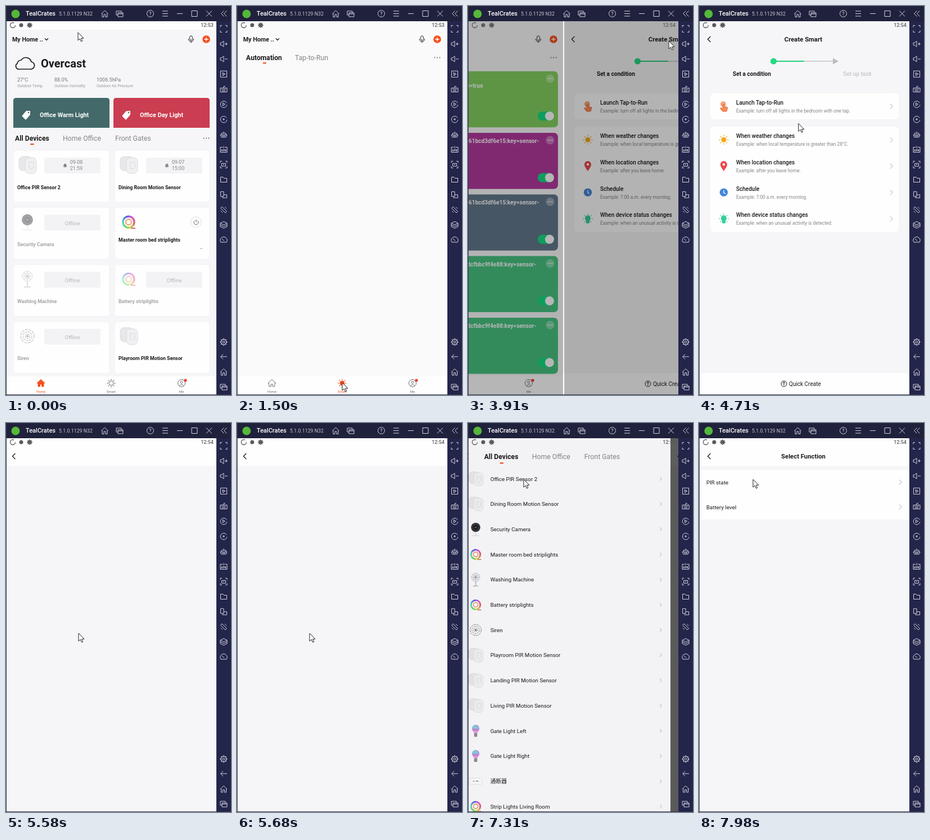
An HTML page that plays this animation: 400x690 px, repeating every 8000 ms.

```html
<!DOCTYPE html>
<html lang="en">
<head>
<meta charset="utf-8">
<style>
  html, body { margin: 0; width: 100%; height: 100%; overflow: hidden; background: #20213c; }
  svg { display: block; font-family: Roboto, "Noto Sans CJK SC", sans-serif; }
</style>
</head>
<body>
<svg id="stage" width="400" height="690" viewBox="0 0 400 690"></svg>
<script>
const PALE = '#f6f6f8', WHITE = '#fefefe', INK = '#1b1b1e', GRAY = '#85858a', ORANGE = '#f4501f';

// Drawing helpers return SVG markup.
const text = (x, y, size, str, fill = INK, weight = 400, anchor = 'start') =>
  `<text x="${x}" y="${y}" font-size="${size}" fill="${fill}" font-weight="${weight}" text-anchor="${anchor}">${str}</text>`;
const rect = (x, y, w, h, fill, r = 0, extra = '') =>
  `<rect x="${x}" y="${y}" width="${w}" height="${h}" fill="${fill}" rx="${r}" ${extra}/>`;
const dot = (x, y, r, fill, extra = '') => `<circle cx="${x}" cy="${y}" r="${r}" fill="${fill}" ${extra}/>`;
const ring = (x, y, r, stroke, width = 1, extra = '') =>
  dot(x, y, r, 'none', `stroke="${stroke}" stroke-width="${width}" ${extra}`);
const path = (d, stroke, width = 1, fill = 'none') =>
  `<path d="${d}" stroke="${stroke}" stroke-width="${width}" fill="${fill}"/>`;
const at = (x, y, content, scale = 1, opacity = 1) =>
  `<g transform="translate(${x} ${y}) scale(${scale})" opacity="${opacity}">${content}</g>`;
const repeat = (n, draw) => Array.from({ length: n }, (_, i) => draw(i)).join('');
const chevron = (x, y, size = 4.5) => path(`M${x - size / 2} ${y - size}l${size} ${size}l${-size} ${size}`, '#c8c8cc', 1.1);
const back = (x, y) => path(`M${x + 2.5} ${y - 5}l-5 5l5 5`, INK, 1.3);
const dots = (x, y, fill, gap = 4.5) => repeat(3, i => dot(x + (i - 1) * gap, y, 1, fill));
const rays = (inner, outer, color) => repeat(8, i =>
  `<g transform="rotate(${i * 45})">${path(`M0 ${-inner}V${-outer}`, color, 1.3)}</g>`);

const HOUSE = 'M-6 0L0-6L6 0M-4.5-1V5.5H-1.5V1H1.5V5.5H4.5V-1';
const WINDOWS = 'M-3-2H6V5H-3ZM-3 0H6M-3 2H-6V-5H3V-2';
const CORNERS = 'M-6-3V-6H-3M3-6H6V-3M6 3V6H3M-3 6H-6V3';
const ARC = 'M5.2-2.5A5.8 5.8 0 1 0 5.8 1';

const icons = {
  pir: rect(-15, -15, 23, 25, '#e8e8ea', 7, 'stroke="#dcdce0"') + rect(-4, -13, 20, 28, '#f0f0f2', 7, 'stroke="#dcdce0"') +
    path('M3-5H11V5Q7 9 3 5Z', '#dadade'),
  camera: dot(0, -4, 10, '#343438') + dot(0, -4, 5, '#1a1a1e') + dot(0, -4, 2, '#58606c') +
    path('M0 6V13', '#dcdce0', 2) + path('M-9 14H9', '#e2e2e6', 2),
  strip: repeat(12, i => ring(0, 0, 10, `hsl(${i * 30 + 10} 62% 60%)`, 3.4,
    `pathLength="12" stroke-dasharray="1.1 10.9" stroke-dashoffset="${-i}"`)) +
    ring(0, 0, 5, '#f0a070', 2.2) + path('M4 11H12', '#d8706a', 2),
  fan: ring(0, -5, 9, '#b4b4ba') + ring(0, -5, 5, '#c4c4ca') + dot(0, -5, 2, '#8a8a90') +
    at(0, -5, rays(2, 9, '#bcbcc2')) + path('M0 4V13M-6 14H6', '#b8b8be', 2),
  siren: repeat(3, i => ring(0, 0, 4 + i * 4, '#77777c', 1.1, `stroke-dasharray="${3 + i} 1.5"`)) + dot(0, 0, 2, '#69696e'),
  bulb: dot(0, -5, 8, '#c08ad8') + path('M-8-5A8 8 0 0 1 0-13L8-5Z', 'none', 0, '#80cbe0') +
    path('M-6 0H6L3 6H-3Z', 'none', 0, '#e69ad8') + rect(-3.5, 5, 7, 8, '#8d8d94', 2),
  relay: rect(-14, -7, 28, 14, '#fafafa', 1, 'stroke="#cccccf" stroke-dasharray="3 2"') + path('M-6 0H-3M0 0H6', '#77777c', 1.5),
  sun: dot(0, 0, 4.5, '#f2a81c') + rays(6.2, 8.5, '#f2a81c'),
  tap: dot(-1, -4, 5, '#f6a680') + path('M-2-3V5L-5 2L-6 4L-2 9H5L7 2L1 0V-4Z', '#ee6b35', 1, '#f58d60'),
  pin: path('M0 9C-3 4-6 1-6-3A6 6 0 0 1 6-3C6 1 3 4 0 9Z', 'none', 0, '#e94a4a') + dot(0, -3, 2.2, WHITE),
  clock: dot(0, 0, 7.2, '#4486d8') + path('M0-4V1L3 2', WHITE, 1.3),
  lamp: path('M-3 6C-3 3-5 2-5-1A5 5 0 0 1 5-1C5 2 3 3 3 6V8H-3Z', 'none', 0, '#36cf9d') + rays(7, 8.8, '#36cf9d'),
  thermometer: path('M-2-7Q0-9 2-7V2A4 4 0 1 1-2 2Z', '#5d96d0', 1.2, '#e6f1fa') + path('M0-4V5', '#2d7fc8', 2),
  chat: dot(0, -1, 6, '#f16a40') + path('M-4 2L-3 7L2 4Z', 'none', 0, '#f16a40') + dots(0, -1, WHITE, 2.6),
  tag: path('M-7 1L0-7L7-7L7 0L0 8Q-1 9-2 8L-7 3Q-8 2-7 1Z', 'none', 0, WHITE) + dot(4, -4, 1.3, '#666'),
  bell: path('M-3 2Q-2 1-2-1A2 2 0 0 1 2-1Q2 1 3 2ZM-1 3H1', GRAY, 0.8, GRAY),
};

function navigation(active) {
  const tint = name => name === active ? ORANGE : '#707075';
  const home = active === 'Home';
  return rect(0, 657, 375, 33, WHITE) +
    at(62, 669, path('M-7 0L0-6.5L7 0H5V6H1.5V2H-1.5V6H-5V0Z', tint('Home'), 1, home ? ORANGE : 'none')) +
    at(187, 669, dot(0, 0, 4, home ? 'none' : ORANGE, `stroke="${tint('Smart')}"`) + rays(5.5, 7.5, tint('Smart'))) +
    at(312, 669, ring(0, 0, 6.5, '#707075') + ring(0, -1.5, 2, '#707075') + path('M-4 5Q0 0 4 5', '#707075') + dot(7, -5, 2.6, '#f0372c')) +
    ['Home', 'Smart', 'Me'].map((name, i) => text(62 + 125 * i, 686, 6, name, tint(name), 400, 'middle')).join('');
}

const homeHeader = text(11, 62.5, 10.7, 'My Home ..', INK, 700) + path('M69 57.5l3 3l3-3', INK, 1.3) +
  at(329, 59, rect(-2.3, -6, 4.6, 8, 'none', 2.3, `stroke="${INK}"`) + path('M-4.5-1Q-4.5 4 0 4Q4.5 4 4.5-1M0 4V6.5', INK)) +
  dot(356, 59, 6.8, ORANGE) + path('M352.5 59h7M356 55.5v7', WHITE, 1.4);

const tabs = (x, y, gap, first, ...others) => text(x, y, 12.2, first, INK, 700) +
  others.map((name, i) => text(x + gap + i * 93, y, 12.3, name, GRAY)).join('');

function deviceCard(index, name, icon, status) {
  const x = index % 2 ? 193 : 13, y = 256 + (index >> 1) * 101.2, w = index % 2 ? 169 : 171;
  const offline = status === 'Offline', left = x + (index % 2 ? 56 : 55), mid = left + 50;
  let body = '';
  if (status && status !== 'on') {
    body = rect(left, y + 13, 100, 28, '#f3f3f5', 2);
    body += offline ? text(mid, y + 31.5, 9.4, status, '#b8b8bc', 400, 'middle')
      : at(left + 37, y + 27, icons.bell) +
        status.split(' ').map((s, i) => text(mid + 7, y + 24 + i * 11, 9, s, GRAY, 400, 'middle')).join('');
  }
  if (status === 'on')
    body = ring(338, y + 26, 9.5, '#dedee2') + at(338, y + 26.5, path('M-2.5-3A4 4 0 1 0 2.5-3M0-5V0', '#66666b')) + path(`M345 ${y + 73}h4`, GRAY, 0.8);
  return rect(x, y, w, 92, WHITE, 5, 'stroke="#f2f2f4"') + at(x + 25, y + 26, icons[icon], 1, offline ? 0.45 : 1) +
    text(x + 7, y + (status === 'on' ? 60.5 : 68.5), 8.8, name, offline ? '#a6a6aa' : INK, 600) + body;
}

const scene = (x, color, name) =>
  path(`M${x} 216V168q0-5 5-5h161q5 0 5 5V216Z`, 'none', 0, color) + at(x + 23, 193, icons.tag) +
  text(x + 47, 196.5, 10.8, name, WHITE, 700);

const home = rect(0, 0, 375, 690, PALE) + rect(0, 27, 375, 15, WHITE) + homeHeader +
  path('M24 112H43A6.5 6.5 0 0 0 45 99A10 10 0 0 0 27 96A7 7 0 0 0 20 102A5.5 5.5 0 0 0 24 112Z', INK, 1.7) +
  text(62, 108.8, 20, 'Overcast', INK, 700) +
  [[20, '27°C', 'Outdoor Temp.'], [86, '88.0%', 'Outdoor Humidity'], [161, '1006.5hPa', 'Outdoor Air Pressure']]
    .map(([x, value, label]) => text(x, 134, 9, value, '#77777c') + text(x, 143.5, 7, label, '#99999e')).join('') +
  scene(13, '#44696a', 'Office Warm Light') + scene(191, '#cb3d50', 'Office Day Light') +
  tabs(16, 238.8, 85, 'All Devices', 'Home Office', 'Front Gates') +
  rect(43, 244, 7, 2.2, ORANGE, 1) + dots(356, 234.5, '#66666b') +
  [['Office PIR Sensor 2', 'pir', '09-08 21:59'], ['Dining Room Motion Sensor', 'pir', '09-07 15:00'],
   ['Security Camera', 'camera', 'Offline'], ['Master room bed striplights', 'strip', 'on'],
   ['Washing Machine', 'fan', 'Offline'], ['Battery striplights', 'strip', 'Offline'],
   ['Siren', 'siren', 'Offline'], ['Playroom PIR Motion Sensor', 'pir', '']]
    .map((device, i) => deviceCard(i, ...device)).join('') + navigation('Home');

function automation(i, color, icon, first, second) {
  const y = 115.7 + i * 109.3;
  return rect(11, y, 353, 99.5, color, 7) + text(18, y + 18, 10.1, first, WHITE, 700) + text(18, y + 29.5, 10.1, second, WHITE, 700) +
    text(18, y + 42, 7, '1 tasks', '#ffffffb8') + dot(350, y + 13, 7.5, '#ffffff50') + dots(350, y + 13, WHITE, 3.4) +
    [19, 83].map(x => rect(x, y + 68.5, 23, 23, WHITE, 5)).join('') +
    at(30.5, y + 80, icons[icon], icon === 'pir' ? 0.55 : 0.9) + at(94.5, y + 80, icons.chat) +
    path(`M53 ${y + 80}h20M52.5 ${y + 77}v6M73.5 ${y + 77}v6`, WHITE, 2) +
    rect(328, y + 71.5, 29, 16, '#14dc82', 8) + dot(349, y + 79.5, 8, WHITE);
}

const office = 'iot-event:id=05b4586b-e72a-439a-b6bc-61bcd3df6e15:key=sensor-';
const dining = 'iot-event:id=dba683c2-244e-4fe7-9a0d-dcfbbc9f4e88:key=sensor-';
const smartLoading = rect(0, 0, 375, 690, '#fafafb') + homeHeader + tabs(16, 96, 87, 'Automation', 'Tap-to-Run') +
  rect(46, 100, 6, 2.2, ORANGE, 1) + dots(356, 91.5, '#66666b') + navigation('Smart');
const smart = smartLoading +
  [['#84d15f', 'thermometer', 'iot-event:id=82c40a10-dcd5-4ede-9195-', 'a928d153f847:key=button-3-single:value=true'],
   ['#b33a9e', 'pir', office, 'pir:value=false'], ['#64788c', 'pir', office, 'pir:value=true'],
   ['#48c380', 'pir', dining, 'pir:value=false'], ['#48c380', 'pir', dining, 'pir:value=true']]
    .map((card, i) => automation(i, ...card)).join('');

const title = str => text(185.5, 63, 11.3, str, INK, 700, 'middle');
const condition = (y, icon, name, example) => at(44, y, icons[icon]) + text(66, y - 3, 10, name, INK, 500) +
  text(66, y + 11, 8.3, 'Example: ' + example, GRAY) + chevron(342, y);

const create = rect(0, 0, 375, 690, PALE) + back(18, 59) + title('Create Smart') +
  path('M187 98H240', '#c4c4c8', 1.6) + path('M132 98H187', '#26d07c', 1.8) + dot(132.5, 98, 5.6, '#26d884') +
  path('M238 92.5L248 98L238 103.5Z', 'none', 0, '#bcbcc0') +
  text(60, 123.8, 10.1, 'Set a condition', INK, 700) + text(256, 123.8, 10.1, 'Set up task', '#cdcdd0', 700) +
  rect(20, 155, 335, 46, WHITE, 7) + rect(20, 214, 335, 187, WHITE, 7) +
  condition(178, 'tap', 'Launch Tap-to-Run', 'turn off all lights in the bedroom with one tap.') +
  condition(237.3, 'sun', 'When weather changes', 'when local temperature is greater than 28°C.') +
  condition(284, 'pin', 'When location changes', 'after you leave home.') +
  condition(330.6, 'clock', 'Schedule', '7:00 a.m. every morning.') +
  condition(377.3, 'lamp', 'When device status changes', 'when an unusual activity is detected.') +
  rect(0, 651, 375, 39, WHITE) + ring(151, 670, 5, INK) + path('M151 673v-6M148.7 669l2.3-2.3l2.3 2.3', INK) +
  text(160, 674, 10, 'Quick Create');

const loading = rect(0, 0, 375, 690, PALE) + rect(0, 27, 375, 49, WHITE) + back(14, 59);

const devices = rect(0, 0, 375, 690, '#f8f8fa') + back(14, 59) +
  tabs(44, 63.5, 85, 'All Devices', 'Home Office', 'Front Gates') + rect(72, 70, 6.5, 2.2, ORANGE, 1) +
  [['Office PIR Sensor 2', 'pir'], ['Dining Room Motion Sensor', 'pir'], ['Security Camera', 'camera'],
   ['Master room bed striplights', 'strip'], ['Washing Machine', 'fan'], ['Battery striplights', 'strip'],
   ['Siren', 'siren'], ['Playroom PIR Motion Sensor', 'pir'], ['Landing PIR Motion Sensor', 'pir'],
   ['Living PIR Motion Sensor', 'pir'], ['Gate Light Left', 'bulb'], ['Gate Light Right', 'bulb'],
   ['通断器', 'relay'], ['Strip Lights Living Room', 'strip']]
    .map(([name, icon], i) => {
      const y = 99 + i * 44.7;
      return at(29, y, icons[icon], 0.82) + text(55, y + 3.5, 9.8, name, INK) + chevron(358, y, 3.2);
    }).join('');

const functionHeader = rect(0, 0, 375, 690, PALE) + rect(0, 27, 375, 49, WHITE) + back(18, 59) + title('Select Function');
const functions = functionHeader + rect(0, 83, 375, 88, WHITE) +
  ['PIR state', 'Battery level'].map((name, i) =>
    text(13, 109 + 44 * i, 9.8, name, INK) + chevron(358, 105 + 44 * i)).join('');

const screens = { home, smartLoading, smart, create, loading, devices, functionHeader, functions };

const LIGHT = '#d3d4e0';
const VOLUME = 'M-6-2H-4L0-5V5L-4 2H-6Z';
const glyph = (x, y, d) => at(x, y, path(d, LIGHT));
const sidebar = [CORNERS, VOLUME + 'M2 0H7M4.5-2.5V2.5', VOLUME + 'M2 0H7',
  'M-5.5-5.5H5.5V5.5H-5.5ZM-2-2.5L3 0L0 1L-1 3Z', 'M-6-2H6V5H-6ZM-4 .5H4M-3 3H3M0-2V-5H3',
  ARC + 'M-1.5-2.5L2.5 0L-1.5 2.5Z', ARC + 'M-1-1H1V1H-1Z', 'M-6 1H6L4 5H-4ZM-4 1V-2H4V1M0-2V-5M-3 3H3',
  'M-6-4V5H6V-4H2M-6-4H-2M0-6V-2', CORNERS + 'M-3.5-2H3.5V3H-3.5ZM-1 0H1', 'M-5.5-4.5H-1L.5-2.5H5.5V4.5H-5.5Z',
  'M-5.5-5.5H0V3H-5.5ZM0 0H5.5V5.5H-2V3', 'M-3-5.5L5.5 3L3 5.5L-5.5-3ZM2-5L5-2M-5 2L-2 5',
  'M0-6L6-3L0 0L-6-3ZM-6-3V3L0 6L6 3V-3M-6 0L0 3L6 0', 'M-5 4A6 6 0 1 1 5 4ZM-3-2L1 1.5'];

const frameArt = rect(0, 0, 400, 27, '#20213c') + rect(374, 27, 26, 663, '#23254a') +
  rect(0, 0, 1, 690, '#30314a') + rect(0, 689, 400, 1, '#30314a') +
  dot(17, 14, 7.5, '#55b83a') + text(35, 17.3, 11, 'TealCrates', '#ffffff', 500) + text(94, 17.2, 8.8, '5.1.0.1129 N32', '#c3c4d0') +
  glyph(175.5, 14, HOUSE) + glyph(202, 14, WINDOWS) + ring(256.5, 13.5, 6, LIGHT) + text(256.5, 17, 9, '?', LIGHT, 400, 'middle') +
  glyph(283, 13.5, 'M-5-4.5H5M-5 0H5M-5 4.5H5') + glyph(309, 13.5, 'M-5 0H5') + glyph(335, 13.5, 'M-5-5H5V5H-5Z') +
  glyph(361, 13.5, 'M-5-5L5 5M5-5L-5 5') + glyph(387.5, 13.5, 'M0-5L-5 0L0 5M5-5L0 0L5 5') +
  sidebar.map((d, i) => glyph(387, 40.5 + i * 26.75, d)).join('') + text(387, 258, 5, 'APK', LIGHT, 700, 'middle') +
  at(387, 596, ring(0, 0, 4.8, LIGHT, 1.2) + ring(0, 0, 2, LIGHT) + rays(5, 6.5, LIGHT)) +
  glyph(387, 622, 'M6 0H-5M-1-4.5L-5.5 0L-1 4.5') + glyph(387, 649.5, HOUSE) + glyph(387, 676, WINDOWS);

const STATUS = '#5a5a5e';
const statusBar = ring(12, 34, 4.5, STATUS, 1.3, 'stroke-dasharray="23 5"') + dot(27, 34, 3.5, STATUS) +
  at(42, 34, dot(0, 0, 3.6, STATUS) + rays(3, 5, STATUS)) +
  `<text id="clock" x="369" y="37.3" font-size="9" font-weight="500" fill="${STATUS}" text-anchor="end"></text>`;

// The shade leaves a thin bright edge on the left of each screen.
const stage = document.getElementById('stage');
stage.innerHTML = `<svg x="1" y="27" width="373" height="662" viewBox="1 27 373 662">` +
  Object.entries(screens).map(([name, art]) =>
    `<g id="${name}">${art}${rect(2.2, 27, 373, 663, '#000')}</g>`).join('') +
  `</svg>${statusBar}${frameArt}<g id="cursor">${path('M0 0V14L3.3 11L5.6 16L7.8 15L5.6 10.2H10Z', '#222', 1, '#fff')}</g>`;

const el = id => document.getElementById(id);
const groups = Object.keys(screens).map(el);
const clock = el('clock'), cursor = el('cursor');

// Start time, screen, and whether it pushes the previous screen away.
const timeline = [[0, 'home'], [1400, 'smartLoading'], [1780, 'smart'], [3752, 'create', true], [5250, 'loading', true],
  [5980, 'devices'], [7272, 'functionHeader', true], [7640, 'functions']];
const PUSH = 300;

const pointer = [[0, 128, 47], [250, 128, 47], [1150, 187, 668], [1850, 187, 668], [2670, 275, 97], [3250, 357, 62],
  [4200, 357, 62], [4710, 177, 208], [5150, 129, 373], [6000, 129, 373], [6800, 99, 100], [7310, 99, 100],
  [7500, 96, 100], [8000, 96, 100]];

const ease = p => (1 - Math.cos(Math.PI * p)) / 2;

// Pointer speed at a waypoint: zero beside a rest, otherwise the mean over both neighbours.
function velocity(i, axis) {
  const before = pointer[i - 1], here = pointer[i], after = pointer[i + 1];
  const rests = other => !other || (other[1] === here[1] && other[2] === here[2]);
  return rests(before) || rests(after) ? 0 : (after[axis] - before[axis]) / (after[0] - before[0]);
}

function pointerAt(t, axis) {
  const i = pointer.findIndex(([time]) => time > t);
  const a = pointer[i - 1], b = pointer[i], span = b[0] - a[0], u = (t - a[0]) / span;
  return a[axis] + (b[axis] - a[axis]) * u * u * (3 - 2 * u) +
    span * u * (1 - u) * ((1 - u) * velocity(i - 1, axis) - u * velocity(i, axis));
}

function place(group, x, shade) {
  group.style.display = '';
  group.setAttribute('transform', `translate(${x} 0)`);
  group.lastElementChild.setAttribute('opacity', shade);
}

function render(now) {
  const t = now % 8000;
  const index = timeline.findLastIndex(([start]) => start <= t);
  const [start, name, push] = timeline[index];
  const p = push ? ease(Math.min(1, (t - start) / PUSH)) : 1;
  groups.forEach(group => group.style.display = 'none');
  if (p < 1) place(el(timeline[index - 1][1]), -373 * p, 0.52 * p);
  place(el(name), 373 * (1 - p), 0.66 * (1 - p));

  clock.textContent = t < 3400 ? '12:53' : '12:54';
  cursor.setAttribute('transform', `translate(${pointerAt(t, 1)} ${pointerAt(t, 2)})`);
  requestAnimationFrame(render);
}
requestAnimationFrame(render);
</script>
</body>
</html>
```
